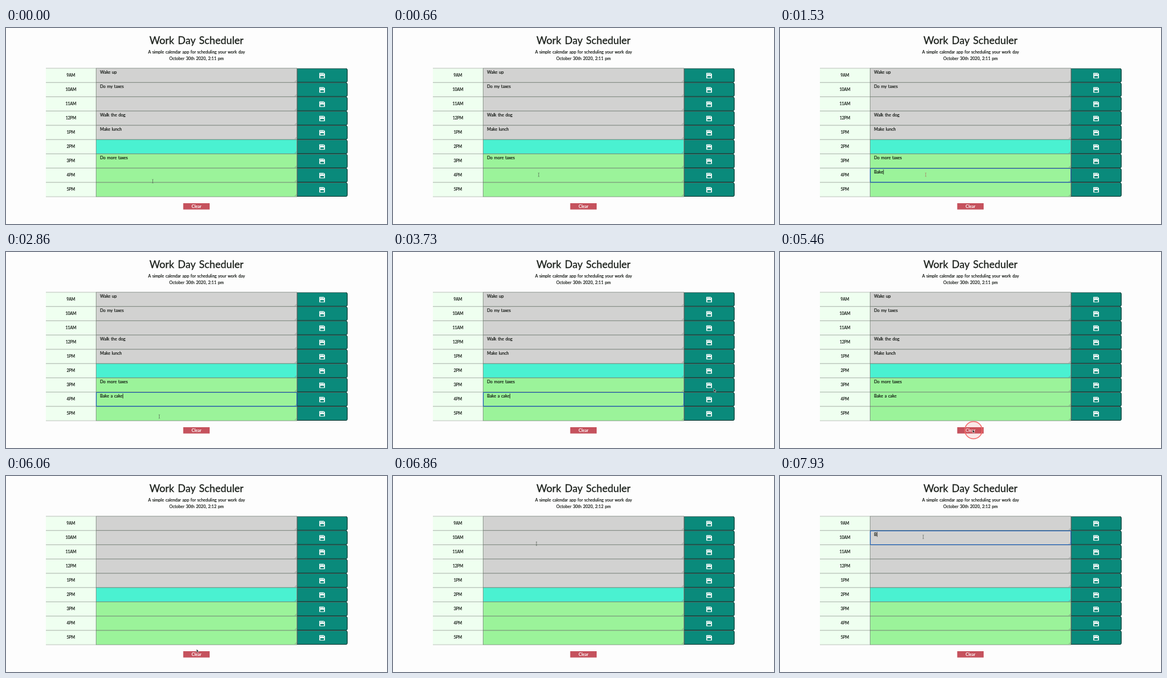
An HTML page that plays this animation: 640x330 px, repeating every 8000 ms.

```html
<!DOCTYPE html>
<html lang="en">
<head>
<meta charset="utf-8">
<title>Work Day Scheduler</title>
<style>
html, body { margin: 0; width: 100%; height: 100%; overflow: hidden; background: #fdfdfd; }
svg { display: block; width: 640px; height: 330px; }
text { font: 7.08px Lato, "Open Sans", sans-serif; word-spacing: .1em; fill: #0b0f0b; stroke: #0b0f0b; stroke-width: .16px; white-space: pre; }
.mid { text-anchor: middle; }
.sub { font-size: 7px; }
.hour { font-size: 6.6px; }
.title { font-size: 17.2px; fill: #1a1f1a; stroke: #1a1f1a; stroke-width: .3px; }
.clear { font-weight: 700; fill: #fff; stroke: none; }
.past { fill: #d2d2d1; }
.present { fill: #4af1d1; }
.future { fill: #9bf39a; }
.area { stroke: #6f7a70; stroke-width: .7; }
.rule { stroke: #a3aaa3; stroke-width: .7; }
.grip { stroke: #777; stroke-width: .5; fill: none; }
</style>
</head>
<body>
<svg viewBox="0 0 640 330">
  <defs>
    <g id="save">
      <path d="M-4.5 -4.4H2.8L4.5 -2.7V4.4H-4.5Z" fill="#fff" stroke="#fff" stroke-width=".3" stroke-linejoin="round"/>
      <path d="M-2.4 -3.8H-1.3V-1.4H-2.4ZM1 -3.8H2.2V-1.4H1ZM-3 .6H3V3.5H-3Z" fill="#0a8a7b"/>
    </g>
  </defs>
  <text class="mid title" x="320" y="27.4">Work Day Scheduler</text>
  <text class="mid sub" x="320" y="43.4">A simple calendar app for scheduling your work day</text>
  <text class="mid sub" id="date" x="320" y="53.6"></text>
  <g id="rows"></g>
  <rect x="297.7" y="295" width="44.4" height="10.6" fill="#c5525d"/>
  <text class="mid clear" x="320" y="302.6">Clear</text>
  <rect id="focus" x="151.6" width="337" height="23.2" rx="1" fill="none" stroke="#1f5fb4" stroke-width="1.2"/>
  <path id="caret" stroke="#111" stroke-width=".8"/>
  <circle id="ring" r="14.6" fill="#f04848" fill-opacity=".12" stroke="#f26a6a" stroke-width="1.5"/>
  <path id="beam" d="M-1 -3.2Q0 -3.2 0 -2.4V2.4Q0 3.2 -1 3.2M1 -3.2Q0 -3.2 0 -2.4M0 2.4Q0 3.2 1 3.2" fill="none" stroke-width=".6"/>
  <path id="arrow" d="M0 0V5.4L1.3 4.3L2.2 6.3L3.1 5.9L2.2 4H3.9Z" fill="#111" stroke="#fff" stroke-width=".5"/>
</svg>
<script>
const LOOP = 8000, RELOAD = 5930;
const TOP = 67.8, ROW = 24.03;
const $ = id => document.getElementById(id);
const hours = ["9AM", "10AM", "11AM", "12PM", "1PM", "2PM", "3PM", "4PM", "5PM"];
const saved = ["Wake up", "Do my taxes", "", "Walk the dog", "Make lunch", "", "Do more taxes", "", ""];

const rowY = i => TOP + i * ROW;
$("rows").innerHTML = hours.map((hour, i) => {
  const y = rowY(i), b = y + ROW, kind = i < 5 ? "past" : i > 5 ? "future" : "present";
  return `<rect x="67" y="${y}" width="84.5" height="${ROW}" fill="#effff0"/>
    <path class="rule" d="M67 ${y}H151M67 ${b}H151"/>
    <text class="mid hour" x="109" y="${y + 14.1}">${hour}</text>
    <rect class="area ${kind}" x="151.3" y="${y}" width="337.4" height="${ROW}"/>
    <path class="grip" d="M485 ${b - 1}l3 -3M486.8 ${b - 1}l1.2 -1.2"/>
    <text class="note" x="158" y="${y + 8.8}"></text>
    <path d="M489 ${y + .2}H571Q573.6 ${y + .2} 573.6 ${y + 2.8}V${b - 2.8}Q573.6 ${b - .2} 571 ${b - .2}H489Z" fill="#0a8a7b"/>
    <path d="M489.4 ${b - .4}V${y + .5}H571" fill="none" stroke="#4c5c59" stroke-width=".8"/>
    <path d="M489 ${b - .6}H571Q573.2 ${b - .6} 573.2 ${b - 2.8}V${y + 2.8}Q573.2 ${y + .6} 571 ${y + .6}" fill="none" stroke="#06211e" stroke-width=".9"/>
    <use href="#save" x="531" y="${y + 12.4}"/>`;
}).join("");
const notes = [...document.querySelectorAll(".note")];

// pointer stops: time, x, y
const stops = [
  [0, 246.5, 258], [700, 244.7, 247], [2500, 244.7, 247], [2860, 257.5, 277],
  [3700, 539, 230], [3760, 539, 230], [4060, 533, 247], [4350, 533, 247], [5200, 323.5, 299],
  [5950, 323.5, 299], [6860, 241, 114], [7150, 240.6, 102.5], [8000, 240.6, 102.5]
];
const clicks = [[930, 244.7, 247], [4200, 533, 247], [5400, 325, 300], [7260, 240.6, 102.5]];
const keys = [1130, 1260, 1370, 1470, 1660, 1760, 1860, 2000, 2130, 2240, 2330];
const fields = [
  { row: 7, from: 930, to: 4200, blink: 2660 },
  { row: 1, from: 7260, to: LOOP, blink: 7860 }
];

function pointer(t) {
  const i = Math.max(1, stops.findIndex(s => s[0] > t));
  const [t0, x0, y0] = stops[i - 1], [t1, x1, y1] = stops[i];
  const p = (t - t0) / (t1 - t0), e = p * p * (3 - 2 * p);
  return [x0 + (x1 - x0) * e, y0 + (y1 - y0) * e];
}

const show = (el, on) => el.setAttribute("visibility", on ? "visible" : "hidden");
const place = (el, x, y) => el.setAttribute("transform", `translate(${x} ${y})`);

function draw(t) {
  const fresh = t >= RELOAD;
  $("date").textContent = `October 30th 2020, 2:1${fresh ? 2 : 1} pm`;
  const words = fresh ? hours.map(() => "") : [...saved];
  if (!fresh) words[7] = "Bake a cake".slice(0, keys.filter(k => k <= t).length);
  else if (t >= 7860) words[1] = "B";
  notes.forEach((n, i) => n.textContent = words[i]);

  const field = fields.find(f => t >= f.from && t < f.to);
  show($("focus"), field);
  show($("caret"), field && (t < field.blink || (t - field.blink) % 1000 < 500));
  if (field) {
    const y = rowY(field.row), x = 158.6 + notes[field.row].getComputedTextLength();
    $("focus").setAttribute("y", y + .5);
    $("caret").setAttribute("d", `M${x} ${y + 2.4}V${y + 10.6}`);
  }

  const [x, y] = pointer(t);
  const inText = x > 151 && x < 489 && y > TOP && y < rowY(9);
  show($("beam"), inText);
  show($("arrow"), !inText);
  place($("beam"), x, y);
  place($("arrow"), x, y);
  $("beam").setAttribute("stroke", t > 930 && t < 2000 ? "#b0685e" : "#4a524a");

  const click = clicks.find(c => t >= c[0] && t < c[0] + 270);
  show($("ring"), click);
  if (click) place($("ring"), click[1], click[2]);
}

const start = performance.now();
function tick() {
  draw((performance.now() - start) % LOOP);
  requestAnimationFrame(tick);
}
tick();
</script>
</body>
</html>
```
